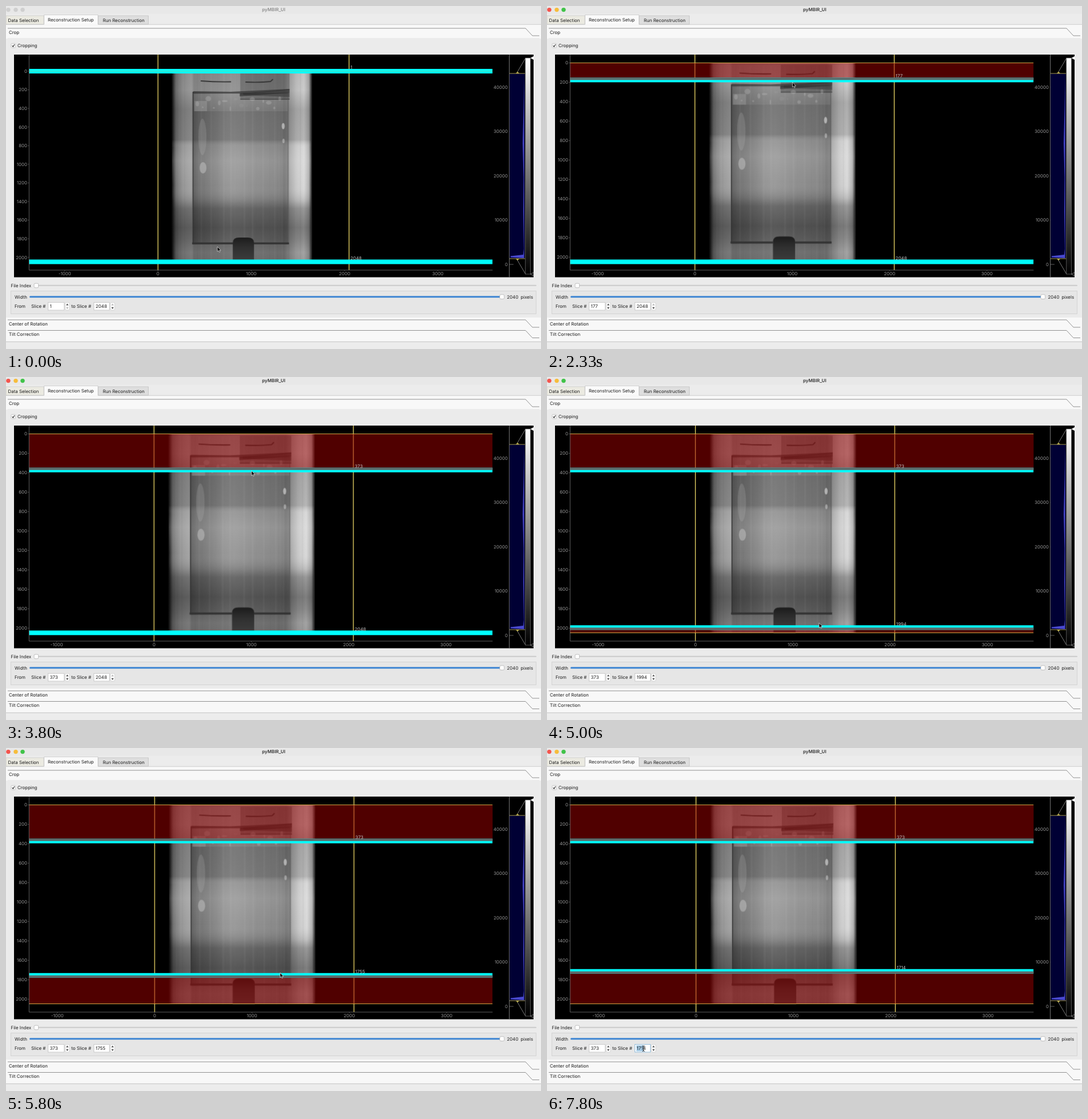
Animation, 934 px wide and 600 px high, one loop 8 s. Source, as an HTML page:

```html
<!DOCTYPE html>
<html lang="en">
<head>
<meta charset="utf-8">
<title>pyMBIR_UI</title>
<style>
  html, body { margin: 0; width: 100%; height: 100%; overflow: hidden; background: #ececec; }
  svg { display: block; }
  text { font: 7.9px Inter, "Liberation Sans", sans-serif; fill: #1c1c1c; white-space: pre; text-rendering: geometricPrecision; }
  .axis text { fill: #969696; }
  .tag { fill: #c4c4c4; }
</style>
</head>
<body>
<svg id="stage" width="934" height="600" viewBox="0 0 934 600"></svg>
<script>
const stage = document.getElementById('stage');
const LOOP = 8000, STEP = 200 / 3;
const BASE = { x: 265.5, y: 114, scale: 0.1628 };
const BOTTOM = 447.5, SLICES = 2048;

const rect = (x, y, w, h, fill, extra = '') =>
  `<rect x="${x}" y="${y}" width="${w}" height="${h}" fill="${fill}" ${extra}/>`;
const line = (d, color, width = 1) =>
  `<path d="${d}" fill="none" stroke="${color}" stroke-width="${width}"/>`;
const label = (x, y, s, extra = '') => `<text x="${x}" y="${y}" ${extra}>${s}</text>`;
const blob = (x, y, rx, ry, fill, alpha) =>
  `<ellipse cx="${x}" cy="${y}" rx="${rx}" ry="${ry}" fill="${fill}" opacity="${alpha}"/>`;
const gradient = (id, vertical, stops) =>
  `<linearGradient id="${id}" x2="${vertical ? 0 : 1}" y2="${vertical ? 1 : 0}">` +
  stops.map(([at, color, alpha = 1]) =>
    `<stop offset="${at}" stop-color="${color}" stop-opacity="${alpha}"/>`).join('') +
  '</linearGradient>';

function defs() {
  return '<defs>' +
    gradient('body', false, [[0, '#000'], [.03, '#707070'], [.08, '#949494'], [.14, '#a2a2a2'], [.16, '#8c8c8c'],
      [.3, '#959595'], [.45, '#a0a0a0'], [.6, '#969696'], [.8, '#8e8e8e'], [.84, '#acacac'],
      [.89, '#cacaca'], [.94, '#d8d8d8'], [.975, '#b0b0b0'], [1, '#000']]) +
    gradient('rows', true, [[0, '#000', .1], [.1, '#000', .06], [.2, '#000', .2], [.36, '#000', .16], [.4, '#fff', .04],
      [.47, '#fff', .12], [.6, '#fff', .02], [.68, '#000', .12], [.72, '#000', .3], [.82, '#000', .42],
      [.88, '#000', .36], [.95, '#000', .25], [1, '#000', .28]]) +
    gradient('panel', false, [[0, '#000', .32], [.06, '#000', .2], [.2, '#000', .13], [.35, '#000', .04],
      [.9, '#000', .07], [1, '#000', .2]]) +
    gradient('ramp', true, [[0, '#fff'], [1, '#000']]) +
    gradient('post', true, [[0, '#1d1d1d'], [.4, '#303030'], [1, '#3e3e3e']]) +
    '<clipPath id="plotClip"><path d="M40 85H849.5V462H40Z"/></clipPath>' +
    '<filter id="soft"><feGaussianBlur stdDeviation=".6"/></filter></defs>';
}

function photo() {
  const stripes = Array.from({ length: 26 }, (_, i) =>
    rect(295 + i * 9 + 3 * Math.sin(i * 5), 118, 2 + 1.5 * Math.sin(i * 3), 330,
      i % 2 ? '#fff' : '#000', 'opacity=".035"')).join('');
  const bubbles = Array.from({ length: 16 }, (_, i) =>
    blob(334 + i * 9.6, 171 + 9 * Math.sin(i * 2.4), 3 + 2 * Math.sin(i * 4), 3 + 1.5 * Math.cos(i * 3),
      '#d0d0d0', i > 6 && i < 10 ? .08 : .25)).join('');
  return rect(289, 114, 246, 333.5, 'url(#body)') +
    rect(290, 114, 243, 333.5, 'url(#rows)') +
    '<g filter="url(#soft)">' +
    rect(326, 150, 167, 267, 'url(#panel)') + stripes +
    rect(328, 154, 164, 30, '#ddd', 'opacity=".1"') +
    rect(409, 117, 86, 47, '#000', 'opacity=".2"') +
    line('M409 154L495 146M409 163L495 163', '#3c3c3c', 1) +
    '<path d="M327 149L392 150L495 145V152L408 158V153L327 153Z" fill="#303030" opacity=".65"/>' +
    '<path d="M414 152H495V159L414 156Z" fill="#282828" opacity=".4"/>' +
    line('M340 131Q365 133 393 132.5M418 133Q445 134 462 132L466 128', '#363636', 1.8) +
    bubbles + rect(329, 166, 22, 18, '#ccc', 'opacity=".22"') +
    blob(343, 229, 7, 32, '#ccc', .18) + blob(344, 283, 6, 10, '#d6d6d6', .4) +
    blob(484, 210, 2.6, 5.5, '#eee', .55) + blob(484.5, 236, 2, 4, '#eee', .4) +
    line('M326.5 150V416', '#333', 1.4) + line('M492.5 160V414', '#555', .7) +
    line('M325 415H396M433 415H494', '#333', 3.2) +
    '<path d="M396 448V414Q396 405 407 405H422Q433 405 433 414V448Z" fill="url(#post)"/></g>';
}

function header(y, title) {
  return rect(0, y - 3, 934, 19, '#f8f8f8') +
    line(`M3 ${y}H907L919 ${y + 13}H931`, '#777', .8) + label(5, y + 9.7, title);
}

function spinner(x, width, id) {
  const a = x + width + 5;
  return rect(x + .5, 518.5, width - 1, 13.5, '#fff', `id="${id}Box" stroke="#c2c2c2" stroke-width=".8"`) +
    rect(156, 520, 0, 10.5, '#a5cbe6', `id="${id}Sel"`) +
    label(x + 3.5, 528, '', `id="${id}Text"`) +
    rect(a - 3.7, 518.5, 7.6, 13.5, '#fbfbfb', 'rx="2" stroke="#c4c4c4" stroke-width=".6"') +
    `<path id="${id}Up" d="M${a - 2} 523.5h4l-2 -3z" fill="#444"/>` +
    `<path id="${id}Down" d="M${a - 2} 527h4l-2 3z" fill="#444"/>`;
}

function chrome() {
  const lights = [4, 17, 29].map((x, i) => `<circle id="light${i}" cx="${x}" cy="6.6" r="3.7"/>`).join('');
  return rect(0, 0, 934, 600, '#ececec') + rect(0, 0, 934, 13.5, '#e8e8e8') + lights +
    label(467.3, 9.4, 'pyMBIR_UI', 'id="title" text-anchor="middle" style="font-weight:600"') +
    rect(0, 32, 934, 25, '#f8f8f8') +
    rect(0, 17, 66, 15, '#ebeae1', 'stroke="#c6c6c6" stroke-width=".7"') +
    rect(161, 17, 87.5, 15, '#dedede', 'stroke="#bdbdbd" stroke-width=".7"') +
    line('M0 32.3H934', '#c4c4c4', .8) +
    rect(66.5, 15.5, 94, 17.4, '#fafafa') + line('M66.5 32V15.5H160.5V32', '#c0c0c0', .7) +
    label(3.5, 27.8, 'Data Selection') + label(73, 27.3, 'Reconstruction Setup') +
    label(169, 27.8, 'Run Reconstruction') +
    header(39, 'Crop') + rect(3, 56, 928, 489, '#ebebeb') +
    rect(9, 65.5, 7.5, 7.5, '#fff', 'rx="1.5" stroke="#aaa" stroke-width=".6"') +
    line('M10.7 69.3L12.3 71.3L15 67', '#222', 1.1) + label(20, 72.3, 'Cropping') +
    label(8.5, 492, 'File Index') + rect(49, 487.7, 877, 2.4, '#cecece', 'rx="1.2"') +
    rect(49, 485.2, 7.6, 7.6, '#fff', 'rx="2" stroke="#aaa" stroke-width=".7"') +
    rect(8.5, 498.5, 917, 40, '#e6e6e6', 'stroke="#cfcfcf" stroke-width=".8"') +
    label(15, 512, 'Width') + rect(41, 507.2, 825, 3, '#3f86d3', 'rx="1.5"') +
    rect(862, 504.8, 7.8, 7.8, '#fff', 'rx="2" stroke="#aaa" stroke-width=".7"') +
    label(874.5, 512, '2040') + label(898.5, 512, 'pixels') +
    label(15, 528, 'From') + label(44, 528, 'Slice #') + label(114, 528, 'to Slice #') +
    spinner(73, 29, 'from') + spinner(153, 28, 'to') +
    rect(0, 545, 934, 42, '#f8f8f8') + header(549, 'Center of Rotation') + header(567.5, 'Tilt Correction') +
    line('M0 587.3H934', '#b8b8b8', .8);
}

function histogram() {
  const ticks = [0, 1, 2, 3, 4].map(i => {
    const y = 452 - i * 77.5;
    return label(876, y + 2.9, i * 10000, 'text-anchor="end"') + line(`M879 ${y}H886`, '#777', .8);
  }).join('');
  return `<g class="axis">${ticks}</g>` + line('M878.7 85V474.5', '#888', .9) +
    rect(879.2, 118, 26.5, 324, '#000034') +
    '<path d="M904.5 125L903.5 180L902 240L903.5 300L903 360L904 425L903 435L881 437.5V439.5L904.5 441Z" fill="#4949cf"/>' +
    line('M879 118H906M879 442H906', '#b9ac50', .9) +
    '<path d="M890 118L893 114.5L896 118ZM890 442L893 445.5L896 442Z" fill="#b9ac50"/>' +
    line('M893 115L907 91M893 445L907 469', '#999', .8) +
    rect(906.8, 91, 8.6, 378, 'url(#ramp)', 'stroke="#777" stroke-width=".7"') +
    '<path d="M915.5 91L921 88V94Z" fill="#fff"/><path d="M915.5 469L921 466V472Z" fill="#000" stroke="#aaa" stroke-width=".7"/>';
}

function plot() {
  const ys = Array.from({ length: 11 }, (_, i) =>
    `<g id="y${i}">${label(37, 2.9, i * 200, 'text-anchor="end"')}${line('M38 0H40.5', '#666', .7)}</g>`).join('');
  const xs = [0, 1, 2, 3, 4].map(i =>
    `<g id="x${i}">${label(0, 470.5, (i - 1) * 1000, 'text-anchor="middle"')}${line('M0 462V464', '#666', .7)}</g>`).join('');
  const bar = id => rect(40, 0, 809.5, 8, '#0ff', `id="${id}Bar"`) + rect(40, 0, 809.5, 0, '#5d6b6b', `id="${id}Shade"`);
  const red = id => rect(40, 0, 809.5, 0, '#a00000', `id="${id}Red" opacity=".5"`);
  return rect(14, 85, 907, 389.5, '#000') +
    `<g clip-path="url(#plotClip)"><g id="photo">${photo()}</g>` +
    line('', '#c4b355', 1.6).replace('<path', '<path id="sides"') +
    red('top') + red('low') + bar('top') + bar('low') +
    line('', '#d6a944', 1).replace('<path', '<path id="bounds"') + '</g>' +
    line('M40.3 85V462H849.5', '#777', .8) +
    `<g class="axis">${ys}${xs}</g>` +
    '<text id="topTag" class="tag"></text><text id="lowTag" class="tag"></text>' + histogram();
}

stage.innerHTML = defs() + chrome() + plot() +
  '<path id="arrow" d="M0 0V8.4L2 6.7L3.3 9.6L4.7 9L3.4 6.3H6Z" fill="#000" stroke="#fff" stroke-width=".6"/>' +
  '<path id="beam" d="M-2 -4.5Q0 -4.5 0 -3Q0 -4.5 2 -4.5M0 -3V3.5M-2 5Q0 5 0 3.5Q0 5 2 5" fill="none" stroke="#111" stroke-width=".9"/>';

const el = {};
stage.querySelectorAll('[id]').forEach(node => el[node.id] = node);
const set = (id, attrs) => { for (const k in attrs) el[id].setAttribute(k, attrs[k]); };
const move = (id, x, y) => set(id, { transform: `translate(${x} ${y})` });

// Keys are [time, value, value, ...], joined by straight segments.
function track(keys, t) {
  if (t <= keys[0][0]) return keys[0].slice(1);
  for (let i = 1; i < keys.length; i++) {
    const a = keys[i - 1], b = keys[i];
    if (t < b[0]) return a.slice(1).map((v, j) => v + (b[j + 1] - v) * (t - a[0]) / (b[0] - a[0]));
  }
  return keys[keys.length - 1].slice(1);
}

const topKeys = [[1930, 1], [2330, 177], [2730, 262], [3070, 297], [3530, 364], [3670, 373]];
const lowKeys = [[4870, 2048], [5000, 1993], [5400, 1850], [5800, 1754], [6200, 1724], [6530, 1714]];
const shiftKeys = [[3600, 428.2], [4400, 428.8], [5800, 429.4], [6700, 430.1]];
const pointerKeys = [[0, 369, 421], [70, 369.5, 420.5], [300, 369.5, 420.5], [600, 405, 260], [930, 444, 139],
  [1030, 444, 139], [1530, 428.5, 115], [1930, 428.5, 115], [2330, 428.5, 133.5], [3070, 428.5, 151.5],
  [3670, 428.5, 164], [3800, 428.5, 164], [4400, 473, 443], [4670, 474, 442], [4870, 474.5, 440],
  [5000, 475, 430], [5800, 478.5, 393], [6530, 480, 386], [6580, 480, 386], [6800, 188, 520],
  [6970, 188, 520], [7130, 174, 525]];

function drawBar(id, y, edge, value, grabbed) {
  const from = Math.min(y, edge), depth = Math.abs(y - edge), shade = Math.min(4, depth);
  set(id + 'Bar', { y: y - 4, fill: grabbed ? '#fff' : '#0ff' });
  set(id + 'Shade', { y: edge < y ? y - shade : y, height: shade });
  set(id + 'Red', { y: from, height: depth });
  el[id + 'Tag'].textContent = value;
}

function drawSpinner(id, value, limit) {
  el[id + 'Text'].textContent = value;
  set(id + (id === 'from' ? 'Down' : 'Up'), { opacity: value === limit ? .4 : 1 });
}

function render(now) {
  const time = now % LOOP;
  const t = Math.max(0, 1930 + Math.floor((time - 1930) / STEP + .06) * STEP);
  const active = time >= 1930;
  const first = Math.round(track(topKeys, t)[0]);
  const last = Math.round(track(lowKeys, t)[0]);

  // The view widens until the upper tag no longer needs room above slice zero.
  const fit = Math.min(1, (first - 1) / 87);
  const y0 = 114 - 14.5 * fit;
  const scale = (BOTTOM - y0) / SLICES;
  const centre = track(shiftKeys, t)[0];
  const X = v => centre + (v - 1000) * scale;
  const Y = v => y0 + v * scale;
  const left = X(0), right = X(SLICES);

  set('photo', { transform: `translate(${left} ${y0}) scale(${scale / BASE.scale}) translate(${-BASE.x} ${-BASE.y})` });
  set('sides', { d: `M${left} 85V462M${right} 85V462` });
  set('bounds', { d: `M40 ${y0}H849.5` + (last < SLICES ? `M40 ${BOTTOM}H849.5` : ''), opacity: active ? 1 : .45 });
  for (let i = 0; i < 11; i++) move('y' + i, 0, Y(i * 200));
  for (let i = 0; i < 5; i++) move('x' + i, X((i - 1) * 1000), 0);

  const topY = Y(first - 1), lowY = Y(last);
  drawBar('top', topY, y0, first, active && time < 1990);
  drawBar('low', lowY, BOTTOM, last, time >= 4870 && time < 4930);
  set('topTag', { x: right + 2.3, y: topY - 4.2 });
  set('lowTag', { x: right + 2.3, y: lowY - 3.8 });

  ['#f4544d', '#f6bd3b', '#41c349'].forEach((c, i) => set('light' + i, { fill: active ? c : '#cfcfcf' }));
  el.title.style.fill = active ? '#333' : '#8d8d8d';
  drawSpinner('from', first, 1);
  drawSpinner('to', last, SLICES);
  set('toBox', { stroke: time >= 7270 ? '#7eb2d8' : '#c2c2c2' });
  set('toSel', { width: time < 7470 ? 0 : time < 7530 ? 6 : time < 7800 ? 20 : 13 });

  const typing = time >= 7130;
  const [px, py] = track(pointerKeys, t);
  move('arrow', px, py);
  move('beam', time < 7470 ? 158 : time < 7530 ? 163 : time < 7800 ? 175 : 168.5, 525.5);
  set('arrow', { visibility: typing ? 'hidden' : 'visible' });
  set('beam', { visibility: typing ? 'visible' : 'hidden' });
}

const start = performance.now();
function frame() {
  render(performance.now() - start);
  requestAnimationFrame(frame);
}
frame();
</script>
</body>
</html>
```
